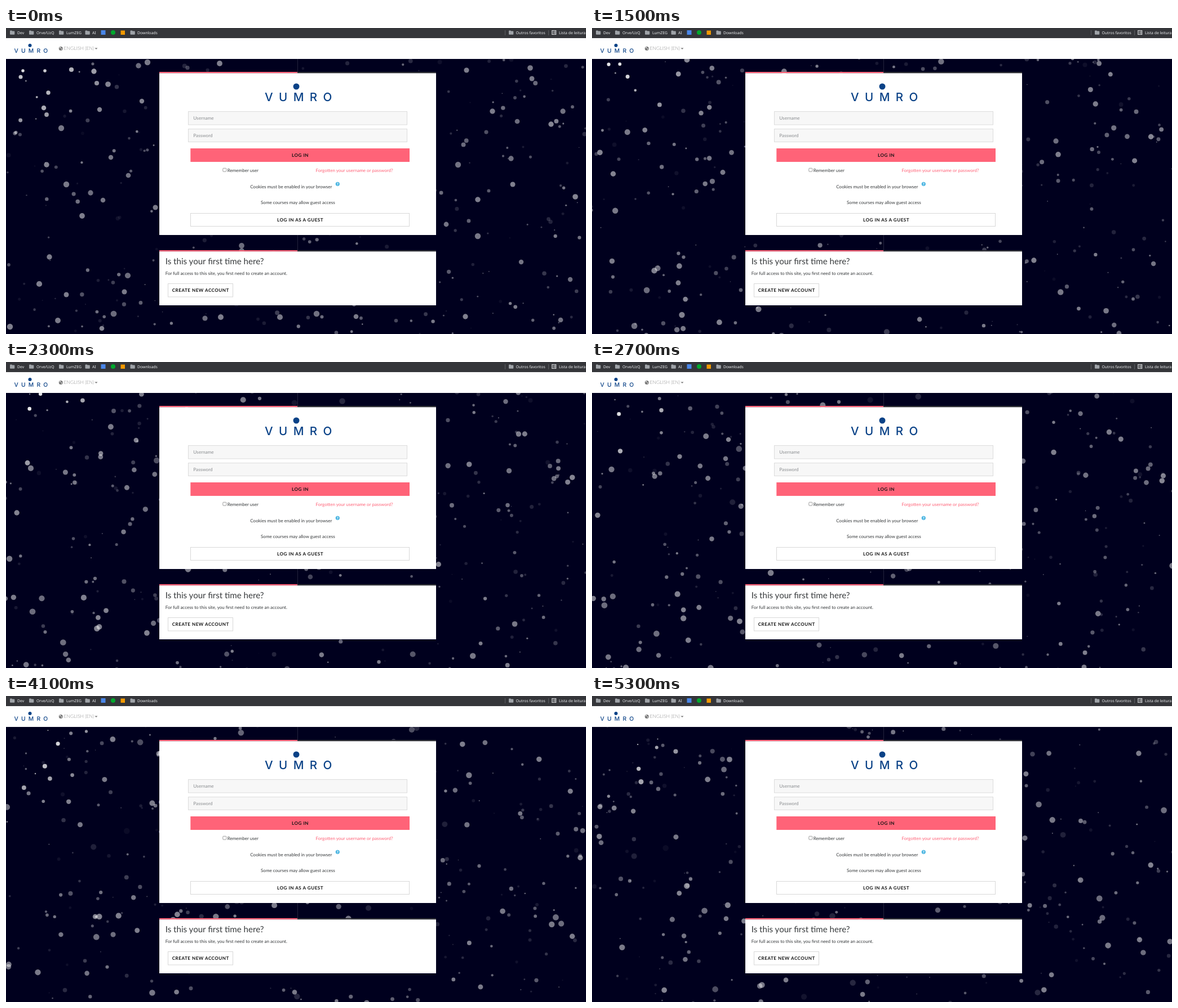
Animation, 1029 px wide and 544 px high, one loop 5.4 s. Source, as an HTML page with a canvas:

```html
<!DOCTYPE html>
<html lang="en">
<head>
<meta charset="utf-8">
<title>Login</title>
<style>
  html, body { margin: 0; width: 100%; height: 100%; overflow: hidden; background: #00001e; }
  canvas, svg { position: absolute; left: 0; top: 0; display: block; }
  text { font: 8.04px Lato, sans-serif; fill: #373a3c; white-space: pre; text-rendering: geometricPrecision; }
  .bar text { font: 6.85px "Noto Sans", "Open Sans", sans-serif; fill: #eceef0; }
  .brand text { font-family: Inter, sans-serif; font-weight: 500; fill: #0a4287; }
  .brand circle { fill: #0a4287; }
  .btn { font-weight: 700; letter-spacing: .536px; fill: #111; }
  .hint { font-size: 8.2px; fill: #8a8d90; }
  .box { fill: #fff; stroke: #d8d8d8; }
  .field { fill: #f7f7f7; stroke: #dcdcdc; }
  .pink { fill: #ff6378; }
  .dark { fill: #2d2e33; }
</style>
</head>
<body>
<canvas id="sky" width="1029" height="544"></canvas>
<svg width="1029" height="544" viewBox="0 0 1029 544">
  <defs>
    <path id="folder" d="M0 1.2q0-.9.9-.9h2.3l1 1h3.2q.9 0 .9.9v4.3q0 .9-.9.9H.9Q0 7.4 0 6.500z" fill="#9fa3a8"/>
  </defs>

  <g class="bar">
    <rect width="1029" height="18" fill="#35363a"/>
    <use href="#folder" x="7" y="4.300"/><text x="20" y="10.700">Dev</text>
    <use href="#folder" x="41" y="4.300"/><text x="54" y="10.700">Orve/UzQ</text>
    <use href="#folder" x="94" y="4.300"/><text x="107" y="10.700">LumZEG</text>
    <use href="#folder" x="140.500" y="4.300"/><text x="153" y="10.700">AI</text>
    <rect x="168.500" y="4" width="8" height="8" fill="#4a86e8"/>
    <circle cx="190" cy="8" r="4" fill="#00a82d"/>
    <rect x="203.500" y="4.500" width="7.500" height="7.500" fill="#f29900"/>
    <use href="#folder" x="220.500" y="4.300"/><text x="233" y="10.700">Downloads</text>
    <path d="M885.500 4v9M962.500 4v9" stroke="#5c5e63"/>
    <use href="#folder" x="892" y="4.300"/><text x="904.500" y="10.700">Outros favoritos</text>
    <rect x="968.700" y="4.500" width="7" height="7" fill="none" stroke="#e4e6e8"/>
    <path d="M970 6.500h1M970 8h1M970 9.500h1M971.800 6.500h3M971.800 8h3M971.800 9.500h3" stroke="#e4e6e8" stroke-width=".8"/>
    <text x="981" y="10.700">Lista de leitura</text>
  </g>

  <rect y="18" width="1029" height="37" fill="#fff"/>
  <g class="brand">
    <circle cx="42.500" cy="31" r="3"/>
    <text x="14.500" y="44.300" style="font-size:10.300px;letter-spacing:5.200px">VUMRO</text>
  </g>
  <circle cx="97.300" cy="36.500" r="3.500" fill="#777"/>
  <path d="M95 34.500l2-.8.6 1.100-1.300 1.500-1.200-.4zM98.200 36l1.700.4-.8 2-1.200.4z" fill="#ddd"/>
  <text x="102.500" y="39.300" style="font-size:8.600px;font-weight:300;fill:#8c8c8c">ENGLISH (EN)</text>
  <path d="M157.500 35.500h5l-2.500 2.500z" fill="#777"/>

  <rect x="272" y="78" width="245" height="2.400" class="pink"/>
  <rect x="517" y="78" width="246" height="2.400" class="dark"/>
  <rect x="272" y="80.300" width="491" height="287.700" fill="#fff"/>
  <g class="brand">
    <circle cx="515" cy="104" r="5.500"/>
    <text x="459" y="130" style="font-size:20.600px;letter-spacing:10.400px">VUMRO</text>
  </g>
  <rect x="323.500" y="148.500" width="388" height="23.500" class="field"/>
  <text x="332.300" y="163.300" class="hint">Username</text>
  <rect x="323.500" y="179.500" width="388" height="23" class="field"/>
  <text x="332.300" y="194" class="hint">Password</text>
  <rect x="327.300" y="214" width="388.700" height="24" class="pink"/>
  <text x="507" y="228.700" class="btn">LOG IN</text>
  <rect x="384.800" y="249.300" width="6" height="6" rx="1" fill="#fff" stroke="#777" stroke-width=".7"/>
  <text x="392.700" y="255.500">Remember user</text>
  <text x="549.500" y="255.500" class="pink" style="fill:#ff6378">Forgotten your username or password?</text>
  <text x="433.300" y="285.200">Cookies must be enabled in your browser</text>
  <circle cx="588.300" cy="277.300" r="3.600" fill="#4db6e2"/>
  <text x="588.300" y="279.600" text-anchor="middle" style="font-size:6.300px;font-weight:900;fill:#fff">?</text>
  <text x="452" y="312.700">Some courses may allow guest access</text>
  <rect x="327.500" y="329.500" width="388" height="23" class="box"/>
  <text x="481" y="343.700" class="btn">LOG IN AS A GUEST</text>

  <rect x="272" y="395" width="245" height="2.400" class="pink"/>
  <rect x="517" y="395" width="246" height="2.400" class="dark"/>
  <rect x="272" y="397.300" width="491" height="95.700" fill="#fff"/>
  <text x="282.700" y="420" style="font-size:15.100px">Is this your first time here?</text>
  <text x="282.700" y="438.700">For full access to this site, you first need to create an account.</text>
  <rect x="287.500" y="454.500" width="115" height="23.500" class="box"/>
  <text x="294.700" y="468.900" class="btn">CREATE NEW ACCOUNT</text>
</svg>
<script>
const W = 1029, TOP = 55, H = 489, LOOP = 5400, PAD = 6;
const ctx = document.getElementById('sky').getContext('2d');

// Moments at which the picture moves on
const steps = [0, 600, 700];
for (let t = 900; t <= 2900; t += 100) steps.push(t);
steps.push(3600, 3800, 4100, 4200, 4500, 4800, 5000, 5300);

let seed = 20431;
function rnd() {
  seed = (seed * 1664525 + 1013904223) % 4294967296;
  return seed / 4294967296;
}
const wrap = (v, n) => ((v % n) + n) % n;

// Start points of the larger dots; the small ones are scattered
const big = [
  30,76, 26,87, 69,76, 116,74, 156,77, 161,98, 181,100, 75,115, 67,142, 72,154,
  98,178, 166,145, 241,130, 235,67, 251,61, 186,230, 72,243, 217,262, 107,278,
  150,293, 172,306, 265,319, 135,334, 77,407, 216,440, 59,455, 210,469, 107,474,
  191,508, 92,520, 7,531, 170,534, 379,63, 418,387, 353,516, 381,514, 486,514,
  551,508, 621,513, 817,75, 930,71, 933,90, 863,148, 988,148, 907,166, 967,171,
  896,232, 802,243, 899,278, 837,305, 1010,300, 837,370, 781,349, 914,416,
  1001,447, 984,519, 815,513
];
const underPanel = (x, y) =>
  x > 272 && x < 763 && ((y > 78 && y < 368) || (y > 395 && y < 493));

function dot(x, y, r, a) {
  const dir = rnd() * Math.PI * 2, v = 20 + 55 * rnd();
  return { x, y, r, a, vx: Math.cos(dir) * v, vy: Math.sin(dir) * v };
}

const dots = [];
for (let i = 0; i < big.length; i += 2) {
  dots.push(dot(big[i], big[i + 1], 4.2 + 1.2 * rnd(), .42 + .1 * rnd()));
}
for (let i = 0; i < 310; i++) {
  const x = rnd() * W, y = TOP + rnd() * H;
  const max = underPanel(x, y) ? 5.5 : 4;
  dots.push(dot(x, y, .5 + (max - .5) * rnd(), .04 + .46 * rnd()));
}

function draw(ms) {
  const s = ms / 1000;
  ctx.fillStyle = '#00001e';
  ctx.fillRect(0, TOP, W, H);
  ctx.fillStyle = 'rgba(255,255,255,.14)';
  ctx.fillRect(517, TOP, 1, 340);
  ctx.fillStyle = '#fff';
  for (const d of dots) {
    const x = wrap(d.x + d.vx * s + PAD, W + 2 * PAD) - PAD;
    const y = wrap(d.y + d.vy * s - TOP + PAD, H + 2 * PAD) - PAD + TOP;
    // Dots get smaller and brighter towards the top left corner
    const near = Math.max(0, 1 - Math.hypot(x - 40, y - 55) / 150);
    ctx.globalAlpha = Math.min(.9, d.a * (1 + near));
    ctx.beginPath();
    ctx.arc(x, y, d.r * (1 - .45 * near), 0, Math.PI * 2);
    ctx.fill();
  }
  ctx.globalAlpha = 1;
}

const start = performance.now();
let shown = -1;
function tick() {
  const t = (performance.now() - start) % LOOP;
  const now = steps.filter(s => s <= t).pop();
  if (now !== shown) draw(shown = now);
  requestAnimationFrame(tick);
}
tick();
</script>
</body>
</html>
```
